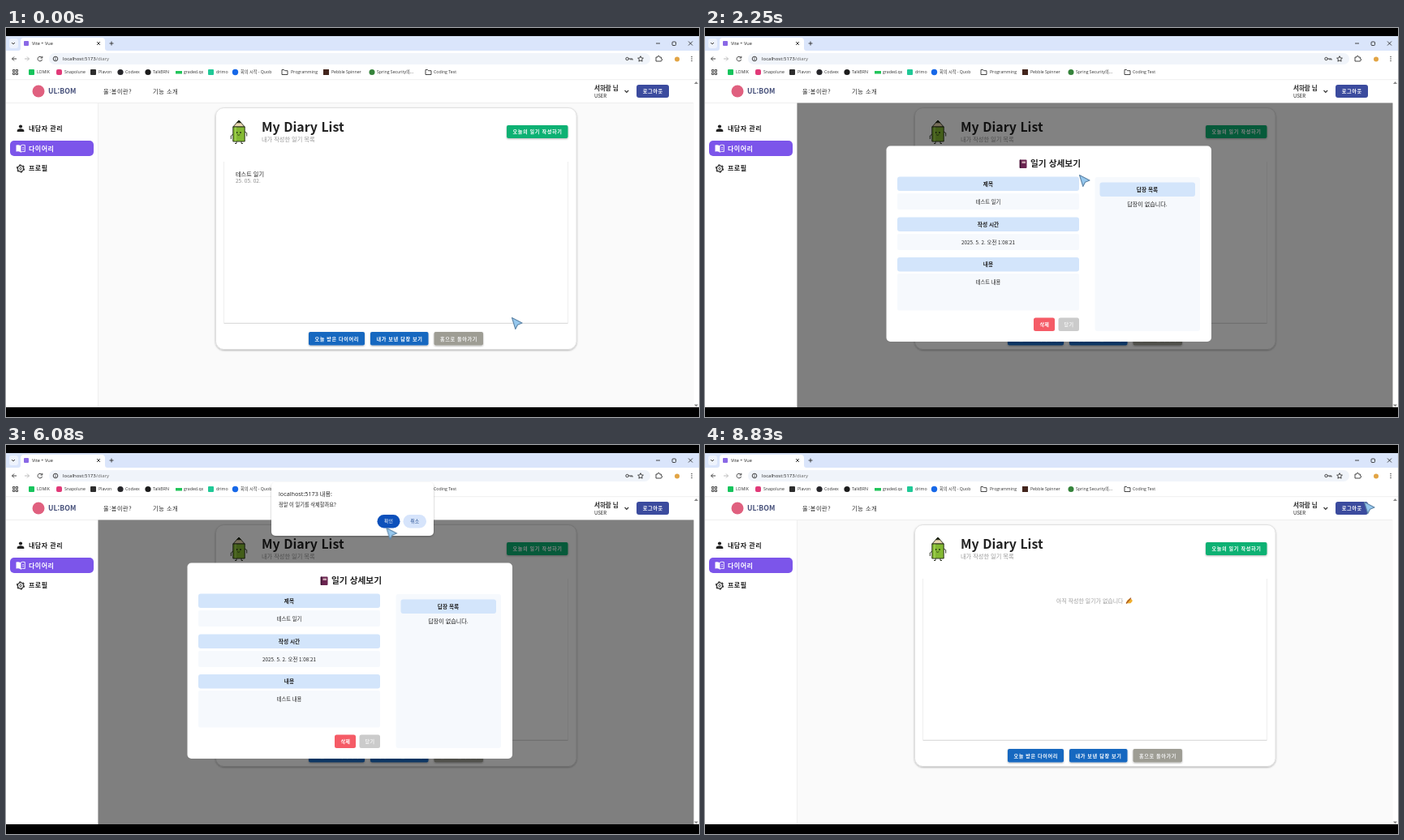
An HTML page that plays this animation: 854 px wide and 480 px high, repeating every 8.91 s.

```html
<!DOCTYPE html>
<html lang="ko">
<head>
<meta charset="utf-8">
<title>My Diary List</title>
<style>
html, body { margin: 0; width: 100%; height: 100%; overflow: hidden; background: #000; }
svg { display: block; width: 854px; height: 480px; }
text { font-family: "Noto Sans CJK KR", "Noto Sans KR", "Noto Sans CJK", sans-serif; fill: #222; white-space: pre; }
.ui text { font-family: "Open Sans", "Noto Sans CJK KR", "Noto Sans", sans-serif; }
.marks text { font-size: 5.2px; fill: #333; }
.line { fill: none; stroke: #333; stroke-width: .9; }
.b { font-weight: 700; }
.m { text-anchor: middle; }
.nav { font-size: 7.1px; font-weight: 500; letter-spacing: .63px; }
.side { font-size: 8px; font-weight: 700; letter-spacing: .5px; }
.btn { font-size: 6.15px; font-weight: 700; letter-spacing: .6px; fill: #fff; text-anchor: middle; }
.head rect { fill: #d3e5fb; }
.head text { font-size: 6.7px; font-weight: 700; text-anchor: middle; }
.body rect { fill: #f6f9fd; }
.body text { font-size: 6.3px; text-anchor: middle; }

/* 8910 ms loop, pictures advance every 1/12 s */
.on { animation: 8910ms step-end infinite; }
.hover { animation-name: hover; }
.ripple { animation-name: ripple; }
.modal { animation-name: modal; }
.entry { animation-name: entry; }
.empty { animation-name: empty; }
.press { animation-name: press; }
.ring { animation-name: ring; }
.alert { animation-name: alert; }
.hand { animation-name: hand; }
.arrow { animation-name: arrow; }
.cursor { animation: cursor 8910ms linear infinite; }

@keyframes hover { 0% { opacity: 0 } 22.39% { opacity: 1 } 25.2%, 100% { opacity: 0 } }
@keyframes ripple { 0% { opacity: 0 } 24.3% { opacity: 1 } 25.2%, 100% { opacity: 0 } }
@keyframes modal { 0% { opacity: 0 } 25.2% { opacity: 1 } 69.19%, 100% { opacity: 0 } }
@keyframes entry { 0% { opacity: 1 } 69.19%, 100% { opacity: 0 } }
@keyframes empty { 0% { opacity: 0 } 69.19%, 100% { opacity: 1 } }
@keyframes press { 0% { opacity: 0 } 45.74% { opacity: 1 } 63.58%, 100% { opacity: 0 } }
@keyframes ring { 0% { opacity: 1 } 68.18%, 100% { opacity: 0 } }
@keyframes alert {
  0% { opacity: 0; transform: translateY(-8px) }
  54.15% { opacity: .6; transform: translateY(-5px) }
  55.16% { opacity: .97; transform: translateY(-2px) }
  56.06% { opacity: 1; transform: translateY(0) }
  69.19% { opacity: .78; transform: translateY(-3px) }
  70.09%, 100% { opacity: 0; transform: translateY(-8px) }
}
@keyframes hand {
  0% { opacity: 0 } 22.39% { opacity: 1 } 25.2% { opacity: 0 }
  45.74% { opacity: 1 } 63.58%, 100% { opacity: 0 }
}
@keyframes arrow {
  0% { opacity: 1 } 22.39% { opacity: 0 } 25.2% { opacity: 1 }
  45.74% { opacity: 0 } 63.58%, 100% { opacity: 1 }
}
@keyframes cursor {
  0% { transform: translate(623px, 357px) }
  15.88% { transform: translate(623px, 357px); animation-timing-function: steps(8, jump-start) }
  23.32%, 26.1% { transform: translate(461px, 181px); animation-timing-function: steps(5, jump-start) }
  30.8% { transform: translate(456px, 188px) }
  44.84% { transform: translate(456px, 188px); animation-timing-function: steps(2, jump-start) }
  46.68% { transform: translate(430px, 367px) }
  63.58% { transform: translate(430px, 367px); animation-timing-function: steps(5, jump-start) }
  68.18% { transform: translate(468.500px, 102px) }
  92.54% { transform: translate(468.500px, 102px); animation-timing-function: steps(8, jump-start) }
  100% { transform: translate(812px, 70px) }
}
</style>
</head>
<body>
<svg viewBox="0 0 854 480">
  <defs>
    <filter id="soft" x="-10%" y="-10%" width="120%" height="125%">
      <feDropShadow dx="0" dy="1" stdDeviation="1" flood-color="#000" flood-opacity=".3"/>
    </filter>
    <path id="folder" class="line" d="M0 1h2.6l1 1.2H7V7H0z"/>
  </defs>

  <rect width="854" height="480"/>

  <!-- browser -->
  <g class="ui">
    <rect y="10" width="854" height="18" fill="#dae5fb"/>
    <rect y="28" width="854" height="36" fill="#fff"/>
    <rect x="4" y="13" width="11" height="12" rx="3" fill="#eef3fd"/>
    <path class="line" d="M7 18l2 2 2-2"/>
    <path d="M15 28q3 0 3-3V16q0-4 4-4h96q4 0 4 4v9q0 3 3 3z" fill="#fff"/>
    <rect x="22" y="16" width="6" height="6" rx="1" fill="#8a68e6"/>
    <text x="32" y="21.200" font-size="5.600">Vite + Vue</text>
    <path class="line" d="M112 17l4 4m0-4l-4 4M127.500 19h5m-2.500-2.500v5M801 19h5M841 16.500l5 5m0-5l-5 5"/>
    <rect class="line" x="821" y="17" width="4.500" height="4.500" rx="1"/>

    <path class="line" d="M13 38H7.500m2.500-2.500L7.500 38l2.500 2.500"/>
    <path class="line" d="M23 38h5.500m-2.500-2.500l2.500 2.500-2.500 2.500" style="stroke:#b5b5b5"/>
    <path class="line" d="M44.200 36.500a2.800 2.800 0 1 0 .4 2.300M44.800 34.800v2.200h-2.200"/>
    <rect x="53" y="31" width="741" height="14" rx="7" fill="#f0f4fa"/>
    <circle class="line" cx="61" cy="38" r="2.800"/>
    <path class="line" d="M61 37.600v2M61 36v.7"/>
    <text x="70" y="40.200" font-size="6.050">localhost:5173<tspan fill="#666">/diary</tspan></text>
    <circle class="line" cx="765.500" cy="38" r="1.700"/>
    <path class="line" d="M767 38h5v1.700m-2-1.700v1.500"/>
    <path class="line" d="M782 34.700l1 2.200 2.400.3-1.800 1.600.5 2.400-2.100-1.200-2.100 1.200.5-2.400-1.800-1.600 2.400-.3z"/>
    <path class="line" d="M801 36h2q0-1.700 1.200-1.700t1.200 1.700h2v2q1.300.1 1.300 1.100t-1.300 1.100V41H801z"/>
    <circle cx="827" cy="38.500" r="3" fill="#e2a444"/>
    <g fill="#333"><circle cx="845" cy="35.500" r=".7"/><circle cx="845" cy="38" r=".7"/><circle cx="845" cy="40.500" r=".7"/></g>

    <g class="marks">
      <path class="line" d="M8.500 51.500h2.300v2.300H8.500zM12.200 51.500h2.300v2.300h-2.300zM8.500 55.200h2.300v2.300H8.500zM12.200 55.200h2.300v2.300h-2.300z"/>
      <rect x="28" y="51" width="7" height="7" rx="1" fill="#16c45c"/><text x="38" y="56.400">LOMIK</text>
      <rect x="62" y="51" width="7" height="7" rx="2" fill="#e13a78"/><text x="72" y="56.400">Snapolune</text>
      <rect x="104" y="51" width="7" height="7" rx="1" fill="#2c2c2c"/><text x="114" y="56.400">Plavon</text>
      <circle cx="141" cy="54.500" r="3.600" fill="#26262a"/><text x="147" y="56.400">Codvex</text>
      <circle cx="175" cy="54.500" r="3.600" fill="#1c1c1c"/><text x="181" y="56.400">TalkBRN</text>
      <rect x="209" y="53" width="8" height="3.500" fill="#22c55a"/><text x="219" y="56.400">graded.qx</text>
      <rect x="249" y="51" width="7" height="7" rx="1" fill="#20c997"/><text x="259" y="56.400">drimo</text>
      <circle cx="282.500" cy="54.500" r="3.700" fill="#1768e8"/><text x="289" y="56.400">회의 시작 - Quob</text>
      <use href="#folder" x="340" y="50.500"/><text x="351" y="56.400">Programming</text>
      <rect x="391" y="51" width="7" height="7" fill="#43251d"/><text x="401" y="56.400">Pebble Spinner</text>
      <circle cx="451" cy="54.500" r="3.500" fill="#35833b"/><text x="457" y="56.400">Spring Security의...</text>
      <use href="#folder" x="517" y="50.500"/><text x="527" y="56.400">Coding Test</text>
    </g>
  </g>

  <!-- page -->
  <rect y="64" width="854" height="404" fill="#fff"/>
  <rect x="113.500" y="92" width="734" height="376" fill="#fafafa"/>
  <path d="M0 63.700H854M0 92.500H847M113.500 93V468" stroke="#ebebeb" stroke-width=".8"/>
  <path d="M848 69l2.500-3 2.500 3zM848 464.500l2.500 3 2.500-3z" fill="#888"/>

  <circle cx="40" cy="78" r="7.500" fill="#e0607f"/>
  <text class="b" x="52" y="81.300" font-size="8.700" style="fill:#434d78">UL:BOM</text>
  <text class="nav" x="120" y="80.700">울:봄이란?</text>
  <text class="nav" x="181" y="80.700">기능 소개</text>
  <text class="b" x="725" y="76.500" font-size="7.500">서하람 님</text>
  <text x="725" y="85.500" font-size="6">USER</text>
  <path class="line" d="M762.500 77l2.300 2.300 2.300-2.300" style="stroke-width:1.200"/>
  <rect x="777" y="70" width="40" height="16" rx="3" fill="#3b4b9e"/>
  <text class="btn" x="797.300" y="80.400" font-size="6.400">로그아웃</text>

  <rect x="5" y="139" width="103" height="19" rx="5" fill="#7c55ea"/>
  <circle cx="18" cy="121.500" r="2.100" fill="#222"/>
  <path d="M13.700 128v-1.300q0-2.500 4.300-2.500t4.300 2.500V128z" fill="#222"/>
  <path d="M12.500 144.500q3-1 5.500.7v8q-2.500-1.700-5.500-.7z" fill="#fff"/>
  <path d="M18 145.200q2.500-1.700 5.300-.7v8q-2.800-1-5.300.7z" fill="none" stroke="#fff" stroke-width=".9"/>
  <path d="M20 147.500h2m-2 2h2" stroke="#fff" stroke-width=".7"/>
  <g class="line">
    <circle cx="18" cy="173.500" r="3.600" style="stroke-width:1.300"/>
    <circle cx="18" cy="173.500" r="1.300"/>
    <circle cx="18" cy="173.500" r="4.500" stroke-dasharray="2.350" style="stroke-width:1.300"/>
  </g>
  <text class="side" x="28" y="126.800">내담자 관리</text>
  <text class="side" x="28" y="151.500" style="fill:#fff">다이어리</text>
  <text class="side" x="28" y="176.400">프로필</text>

  <!-- diary card -->
  <rect x="258.500" y="98.500" width="444.500" height="298" rx="10" fill="#fff" stroke="#dcdcdc" stroke-width=".8" filter="url(#soft)"/>
  <g stroke="#1e2414" stroke-width=".9" stroke-linejoin="round">
    <path d="M280 131l-2.700 2v4M294 128l2.700 1.500v4M284 140v2.500h-2M290 140v2.500h2" fill="none"/>
    <path d="M279.800 122l7.200-8 7.200 8z" fill="#e9d7b0"/>
    <path d="M284.500 116.800l2.500-2.800 2.500 2.800z" fill="#1e2414"/>
    <path d="M279.800 122h14.400v18h-14.400z" fill="#83b932"/>
    <path d="M283 122.500v17" stroke="#a8d45c" stroke-width="1.300"/>
    <path d="M285 131.500q1.700 1.800 3.400 0" fill="none" stroke-width=".7"/>
    <circle cx="284.700" cy="129" r=".5"/><circle cx="289" cy="129" r=".5"/>
  </g>
  <text class="b" x="315" y="128" font-size="15.900">My Diary List</text>
  <text x="315" y="139.700" font-size="7.200" style="fill:#999">내가 작성한 일기 목록</text>
  <rect x="617" y="120" width="75.500" height="16" rx="2" fill="#0fb173" filter="url(#soft)"/>
  <text class="btn" x="655" y="130.300">오늘의 일기 작성하기</text>

  <path d="M268.500 165V364M692.500 165V364" stroke="#ebebeb" stroke-width=".8"/>
  <path d="M268.500 364.300H692.500" stroke="#d4d4d4"/>
  <g class="on entry">
    <rect class="on hover" x="276" y="172.500" width="409.500" height="21.500" fill="#f2f2f2"/>
    <rect class="on ripple" x="324" y="172.500" width="295" height="21.500" rx="1" fill="#c8c8c8"/>
    <text x="283" y="182.600" font-size="7.200">테스트 일기</text>
    <text x="283" y="191.200" font-size="6.500" style="fill:#888">25. 05. 02.</text>
  </g>
  <g class="on empty">
    <text x="433" y="195" font-size="6.950" style="fill:#9e9e9e">아직 작성한 일기가 없습니다</text>
    <path d="M519 195.500l1-3.500 3-2.500 3 1 .8 2-2.300 2.700z" fill="#f0ae2e"/>
    <path d="M519 195.500l6-6.800" stroke="#a0522a" stroke-width="1.200"/>
  </g>

  <g filter="url(#soft)">
    <rect x="373" y="375" width="69" height="16.500" rx="2" fill="#1867c0"/>
    <rect x="449" y="375" width="71.500" height="16.500" rx="2" fill="#1867c0"/>
    <rect x="527.500" y="375" width="60.500" height="16.500" rx="2" fill="#9e9d94"/>
  </g>
  <text class="btn" x="407.800" y="385.600">오늘 받은 다이어리</text>
  <text class="btn" x="485" y="385.600">내가 보낸 답장 보기</text>
  <text class="btn" x="558" y="385.600" style="fill:#f0f0f0">홈으로 돌아가기</text>

  <!-- diary detail -->
  <g class="on modal">
    <rect x="113.500" y="92.500" width="734" height="375.500" opacity=".49"/>
    <rect x="223.500" y="145.500" width="400.500" height="241.500" rx="5" fill="#fff"/>
    <rect x="387.500" y="162.500" width="9" height="10.500" rx="1" fill="#6a2450"/>
    <path d="M388.700 162.500v10.500" stroke="#2b1428"/>
    <rect x="390.500" y="164.500" width="4.500" height="2.500" fill="#c9a5b0"/>
    <text class="b" x="401" y="171.300" font-size="10.700">일기 상세보기</text>

    <g class="body">
      <rect x="237" y="204" width="224" height="20" rx="2"/><text x="349" y="217.200">테스트 일기</text>
      <rect x="237" y="254" width="224" height="20" rx="2"/><text x="349" y="266.700">2025. 5. 2. 오전 1:08:21</text>
      <rect x="237" y="303" width="224" height="45.500" rx="2"/><text x="349" y="316.300">테스트 내용</text>
      <rect x="480.500" y="184" width="129.500" height="190" rx="3"/><text x="545" y="219.700" style="font-size:7.100px">답장이 없습니다.</text>
    </g>
    <g class="head">
      <rect x="237" y="183.500" width="224" height="17.500" rx="3"/><text x="349" y="194.700">제목</text>
      <rect x="237" y="233.500" width="224" height="17.500" rx="3"/><text x="349" y="244.700">작성 시간</text>
      <rect x="237" y="283" width="224" height="17.500" rx="3"/><text x="349" y="294.200">내용</text>
      <rect x="486.500" y="190.500" width="117.500" height="17.500" rx="3"/><text x="545" y="201.700">답장 목록</text>
    </g>
    <rect x="405" y="357.500" width="26" height="16.500" rx="2.500" fill="#f55b66"/>
    <rect class="on press" x="405" y="357.500" width="26" height="16.500" rx="2.500" fill="#f33440"/>
    <text class="btn" x="418.300" y="368" style="letter-spacing:.2px">삭제</text>
    <rect x="435.500" y="357.500" width="25.500" height="16.500" rx="2.500" fill="#cbcbcb"/>
    <text class="btn" x="448.400" y="368" style="letter-spacing:.2px;fill:#f2f2f2">닫기</text>
  </g>

  <!-- confirm box -->
  <g class="ui on alert">
    <rect x="327" y="46" width="200" height="66" rx="5" fill="#fff" filter="url(#soft)"/>
    <text x="336" y="63.300" font-size="7.250">localhost:5173 내용:</text>
    <text x="336" y="76.200" font-size="6.250">정말 이 일기를 삭제할까요?</text>
    <rect class="on ring" x="455.500" y="84.500" width="31.500" height="19.500" rx="9.750" fill="#fff" stroke="#1b4fa8" stroke-width="1.300"/>
    <rect x="457.500" y="86" width="28" height="16.500" rx="8.250" fill="#0c50bb"/>
    <rect x="489.500" y="86" width="28.500" height="16.500" rx="8.250" fill="#d6e4fb"/>
    <text class="m" x="471.500" y="96.300" font-size="5.900" style="fill:#fff">확인</text>
    <text class="m" x="503.700" y="96.300" font-size="5.900" style="fill:#1f4a90">취소</text>
  </g>

  <g class="cursor">
    <path class="on arrow" d="M.5.5L13 7 7.500 9.200 4.800 14.500z" fill="#96c8ee" stroke="#5f86a8" stroke-width="1.100" stroke-linejoin="round"/>
    <path class="on hand" d="M-.8.8q1-1.300 1.900 0V5l4.200 1q1.500.4 1.300 2l-.6 3.500-1.300 2.300H.3L-3 9.500q-.4-1.600 1-1.300l1.200 1z" fill="#8fbfe4" stroke="#5a80a2" stroke-width=".9" stroke-linejoin="round"/>
  </g>
</svg>
</body>
</html>
```
